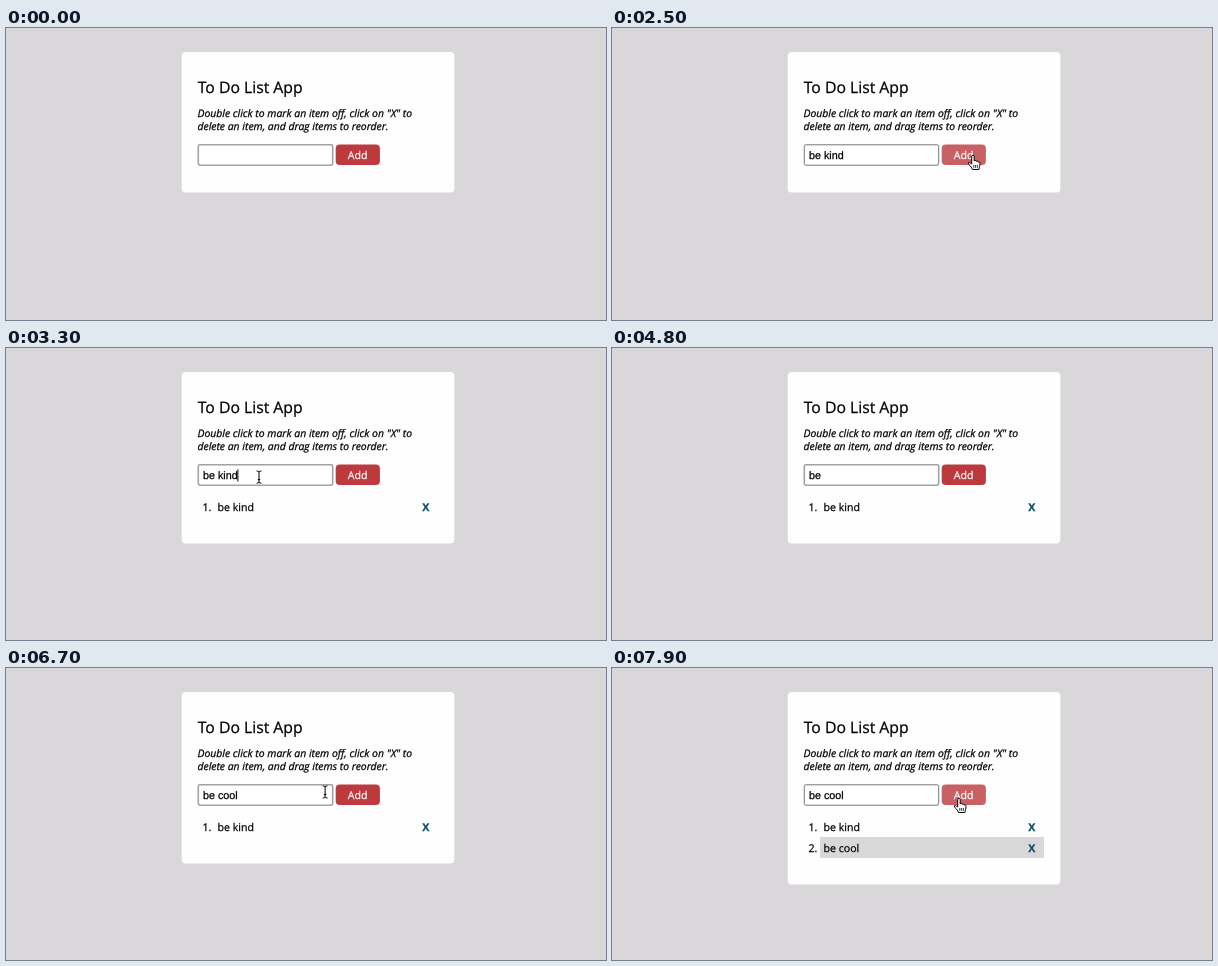
Recreate the animation shown at these times as an HTML page. Size 600 by 292 pixels, loop 8 s.

```html
<!DOCTYPE html>
<html lang="en">
<head>
<meta charset="utf-8">
<title>To Do List App</title>
<style>
  html, body { margin: 0; width: 100%; height: 100%; overflow: hidden; background: #d9d7d9; }
  svg { display: block; width: 600px; height: 292px; }
  text {
    font: 10.6px "Open Sans", sans-serif; white-space: pre; text-rendering: geometricPrecision;
    fill: #000; stroke: #000; stroke-width: .25;
  }
  .title { font-size: 15.75px; }
  .hint { font-size: 10.44px; font-style: italic; }
  .label { fill: #fff; stroke: #fff; }
  .remove { font-weight: 700; fill: #0b5060; stroke: #0b5060; }
  #field { fill: #fff; stroke: #777; stroke-width: 1; }
  #field.focus { stroke: #9fa2a6; stroke-width: 1.6; }
  #value { font: 10.75px "Liberation Sans", Arial, sans-serif; }
  #button { fill: #bc3a3e; }
  #button.hover { fill: #c96164; }
  .pointer { stroke: #000; stroke-linejoin: round; }
</style>
</head>
<body>
<svg viewBox="0 0 600 292">
  <rect id="card" x="175.7" y="24" width="272.7" rx="4" fill="#fffeff"/>
  <text class="title" x="191.7" y="65">To Do List App</text>
  <text class="hint" x="191.5" y="89">Double click to mark an item off, click on "X" to</text>
  <text class="hint" x="191.5" y="102">delete an item, and drag items to reorder.</text>

  <rect id="field" x="192.3" y="116.8" width="134.4" height="20.4" rx="1.6"/>
  <text id="value" x="197" y="131"></text>
  <rect id="caret" y="121.5" width="1" height="12"/>

  <rect id="button" x="329.7" y="116.4" width="44.2" height="20.6" rx="4"/>
  <text class="label" x="341.8" y="131">Add</text>

  <g id="list"></g>

  <g id="beam" class="pointer" fill="none">
    <path d="M-2.4-6Q0-6 0-4.6Q0-6 2.4-6M0-4.6V4.8M-2.4 6.2Q0 6.2 0 4.8Q0 6.2 2.4 6.2M-1.2 2.6H1.2"/>
  </g>
  <path id="arrow" class="pointer" d="M0 0V11.5L2.7 9L4.5 13L6.4 12.2L4.7 8.3H8.2Z" stroke-width=".8"/>
  <g id="hand" class="pointer">
    <path d="M-1.3.6C-1.3-1 1.2-1 1.2.6V5C1.5 4.2 3.3 4.3 3.4 5.4C3.9 4.8 5.4 5 5.5 6.2C6.1 5.7 7 6 7 7.2C7 10 6.4 10.6 5.9 13.5H-.6C-1 11.5-3 10-4.4 8C-5.2 6.5-3.6 5.7-2.6 6.8L-1.3 8.2Z" fill="#fff"/>
    <path d="M.8 9V11.8M2.6 9V11.8M4.4 9V11.8" stroke-width=".8"/>
  </g>
</svg>
<script>
const LOOP = 8000, STEP = 100, BLINK = 500, ROW = 21;
const $ = id => document.getElementById(id);

const tasks = [{ name: 'be kind', added: 2600 }, { name: 'be cool', added: 7600 }];

$('list').innerHTML = tasks.map(({ name }, i) => `
  <g transform="translate(0 ${i * ROW})">
    ${i % 2 ? '<rect x="208" y="148" width="224" height="21" fill="#d9d7d9"/>' : ''}
    <text x="196.4" y="163">${i + 1}.</text>
    <text x="211.6" y="163">${name}</text>
    <text class="remove" x="416.3" y="163">X</text>
  </g>`).join('');
const rows = [...$('list').children];

// Each stroke sets the field text and restarts the caret blink.
const strokes = [{ at: -BLINK, text: '' }];

function edit(at, pace, from, to) {
  const dir = Math.sign(to.length - from.length);
  const whole = dir > 0 ? to : from;
  for (let n = from.length; n !== to.length; at += pace) {
    n += dir;
    strokes.push({ at, text: whole.slice(0, n) });
  }
}

edit(200, 100, '', 'be ');
edit(700, 166, 'be ', 'be kind');
strokes.push({ at: 3300, text: 'be kind' });
edit(3900, 130, 'be kind', 'be ');
edit(5200, 200, 'be ', 'be cool');

// Pointer moves along a Bezier curve, then rests until it hides or moves on.
const moves = [
  { start: 1700, end: 2500, until: 2600, pts: [[295, 91], [300, 88], [400, 155], [361, 128]] },
  { start: 2600, end: 3000, until: 3500, pts: [[361, 128], [361, 131], [253, 131], [253, 129]] },
  { start: 6200, end: 7000, until: LOOP, pts: [[253, 129], [300, 136], [323, 112], [347, 131]] }
];

function bezier(pts, k) {
  const j = 1 - k, w = [j ** 3, 3 * j * j * k, 3 * j * k * k, k ** 3];
  const sum = axis => pts.reduce((s, p, i) => s + p[axis] * w[i], 0);
  return { x: sum(0), y: sum(1) };
}

function pointerAt(t) {
  const m = moves.find(m => t >= m.start && t < m.until);
  return m && bezier(m.pts, Math.min(1, (t - m.start) / (m.end - m.start)));
}

const inside = (p, x0, y0, x1, y1) => p.x >= x0 && p.x <= x1 && p.y >= y0 && p.y <= y1;

function pointerKind(p) {
  if (!p) return '';
  if (inside(p, 330, 116, 374, 138)) return 'hand';
  if (inside(p, 191, 116, 328, 138) || inside(p, 191, 79, 408, 104)) return 'beam';
  return 'arrow';
}

const show = (el, on) => el.style.display = on ? '' : 'none';

function render(t) {
  const { at, text } = strokes.filter(s => s.at <= t).pop();
  const focused = t < 2500 || (t >= 3300 && t < 7500);
  $('field').classList.toggle('focus', focused);
  $('value').textContent = text;
  $('caret').setAttribute('x', 196.7 + $('value').getComputedTextLength());
  show($('caret'), focused && Math.floor((t - at) / BLINK) % 2 === 0);

  const count = tasks.filter(task => t >= task.added).length;
  rows.forEach((row, i) => show(row, i < count));
  $('card').setAttribute('height', 140.5 + (count && 10 + ROW * count));

  const p = pointerAt(t), kind = pointerKind(p);
  $('button').classList.toggle('hover', kind === 'hand');
  for (const id of ['beam', 'arrow', 'hand']) {
    show($(id), id === kind);
    if (id === kind) $(id).setAttribute('transform', `translate(${p.x} ${p.y})`);
  }
}

const start = performance.now();
function tick() {
  const t = (performance.now() - start) % LOOP;
  render(Math.floor(t / STEP) * STEP);
  requestAnimationFrame(tick);
}
tick();
</script>
</body>
</html>
```
